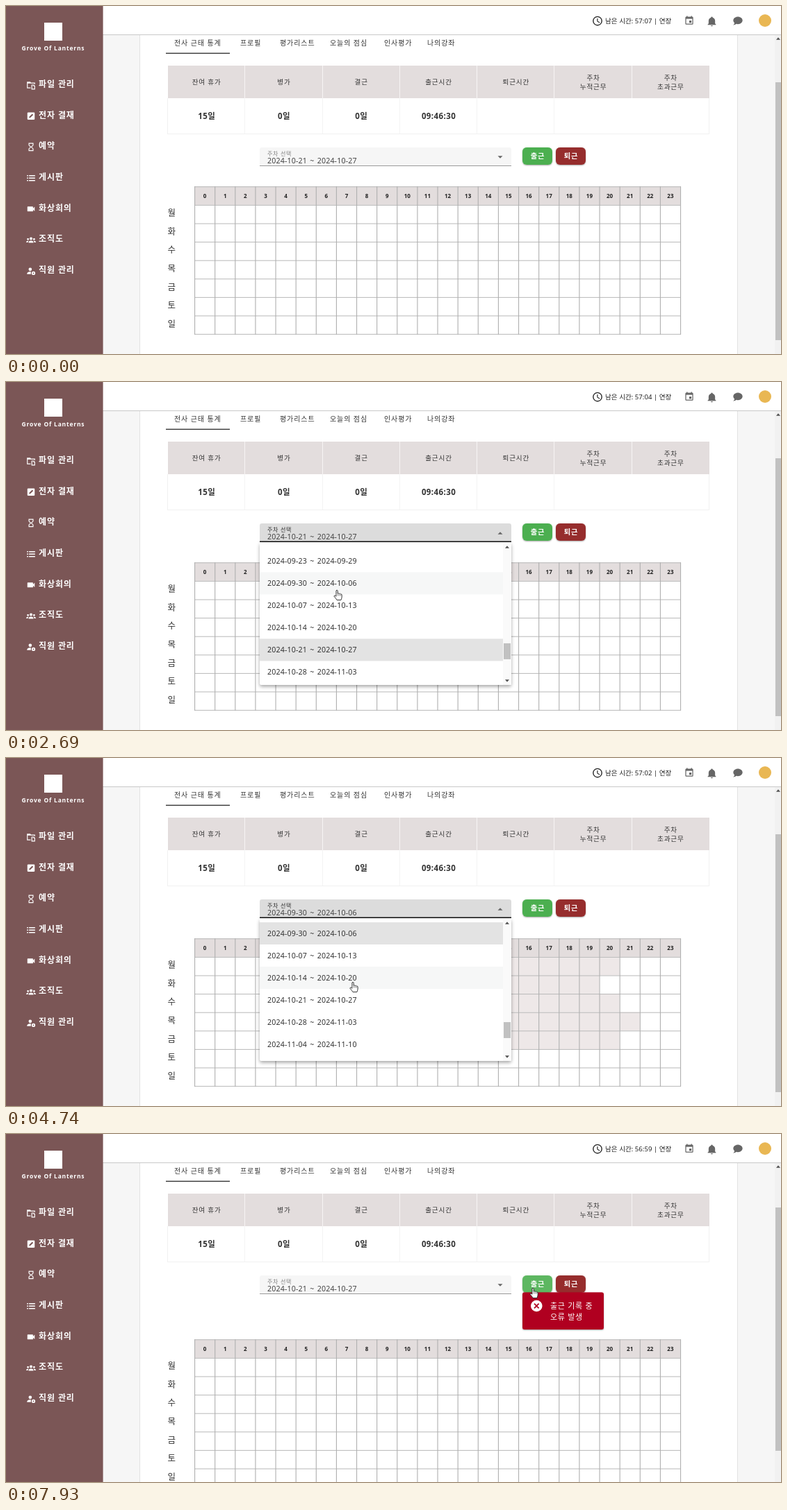
These frames come from a looping animation (1115x502 px, 8000 ms). An HTML page with a canvas:

```html
<!DOCTYPE html>
<html lang="ko">
<head>
<meta charset="utf-8">
<style>
html, body { margin: 0; width: 100%; height: 100%; overflow: hidden; background: #fff; }
canvas { display: block; }
</style>
</head>
<body>
<canvas id="stage" width="1115" height="502"></canvas>
<script>
const ctx = document.getElementById('stage').getContext('2d');
const LOOP = 8000;
const FAMILY = '"Noto Sans", "Noto Sans CJK KR", "Noto Sans CJK", sans-serif';

// Event times in ms
const FIRST_TICK = 300, FOCUS = 1170, BLUR = 7540, ERROR = 7700;
const MENUS = [
  { click: FOCUS, open: 1300, close: 2900, selected: 3 },
  { click: 4050, open: 4130, close: 5550, selected: 0 }
];
const DATA_ON = 3120, DATA_OFF = 5800;
const HOURS = [[9, 20], [8, 19], [8, 20], [9, 21], [9, 20]];

// Pointer path: time, x, y
const PATH = [
  [190, 1027, 485], [810, 560, 240], [950, 560, 240], [1150, 495, 226], [1180, 494, 227],
  [1280, 491, 242], [1750, 479, 330], [1880, 479, 330], [2030, 470, 275], [2250, 472, 285],
  [2570, 475, 294], [2630, 475, 294], [2690, 476, 300], [2840, 476, 300], [3310, 549, 330],
  [3450, 556, 335], [3650, 556, 335], [3950, 520, 222], [4060, 520, 222], [4400, 512, 262],
  [4470, 512, 262], [4580, 503, 312], [4740, 499, 323], [5070, 482, 347], [5500, 482, 347],
  [5600, 482, 349], [6070, 614, 221], [6140, 614, 221], [6900, 745, 223], [6960, 745, 223],
  [7370, 758, 222]
];

const ICONS = {
  clock: 'M12 2A10 10 0 1 0 12 22A10 10 0 1 0 12 2M12 4A8 8 0 1 1 12 20A8 8 0 1 1 12 4M11 7H12.7V12.2L17 14.8L16.2 16.2L11 13Z',
  calendar: 'M5 3H6V1H8V3H16V1H18V3H19Q21 3 21 5V19Q21 21 19 21H5Q3 21 3 19V5Q3 3 5 3M5 8V19H19V8ZM12 12H17V17H12Z',
  bell: 'M21 19V20H3V19L5 17V11C5 7.9 7 5.2 10 4.3A2 2 0 1 1 14 4.3C17 5.2 19 7.9 19 11V17ZM14 21A2 2 0 0 1 10 21Z',
  chat: 'M12 3C17.5 3 22 6.6 22 11S17.5 19 12 19Q10 19 8.5 18.5C5.5 21 2 21 2 21Q4.6 18.4 4.7 16.5C3 15 2 13.1 2 11C2 6.6 6.5 3 12 3Z',
  folder: 'M2 4H10L12 6H22V10H20V8H4V18H11V20H2ZM13 11H19L22 14V23H13ZM15 13V21H20V15H18V13Z',
  edit: 'M5 3H19Q21 3 21 5V19Q21 21 19 21H5Q3 21 3 19V5Q3 3 5 3M7 17L10.5 16L17.5 9L15 6.5L8 13.5Z',
  hourglass: 'M6 2H18V8L14 12L18 16V22H6V16L10 12L6 8ZM8 4V7.5L12 11.5L16 7.5V4ZM12 12.5L8 16.5V20H16V16.5Z',
  list: 'M2 5H5V7.5H2ZM7 5H22V7.5H7ZM2 11H5V13.5H2ZM7 11H22V13.5H7ZM2 17H5V19.5H2ZM7 17H22V19.5H7Z',
  video: 'M4 6H16Q17 6 17 7V10.5L21 6.5V17.5L17 13.5V17Q17 18 16 18H4Q3 18 3 17V7Q3 6 4 6Z',
  group: 'M8.5 8.5A3.5 3.5 0 0 1 15.5 8.5A3.5 3.5 0 0 1 8.5 8.5M6 19Q6 13.5 12 13.5T18 19ZM2 10A2.5 2.5 0 0 1 7 10A2.5 2.5 0 0 1 2 10M17 10A2.5 2.5 0 0 1 22 10A2.5 2.5 0 0 1 17 10M0 18Q0 13.5 6 13.5Q4.5 15 4.5 18ZM24 18Q24 13.5 18 13.5Q19.5 15 19.5 18Z',
  staff: 'M6 8A4 4 0 0 1 14 8A4 4 0 0 1 6 8M2 20Q2 14 10 14H12Q11 17 12 20ZM13.5 17.5A4.5 4.5 0 0 1 22.5 17.5A4.5 4.5 0 0 1 13.5 17.5M16.5 17.5A1.5 1.5 0 0 0 19.5 17.5A1.5 1.5 0 0 0 16.5 17.5'
};
for (const name in ICONS) ICONS[name] = new Path2D(ICONS[name]);
const ARROW = new Path2D('M0 0V10.5L2.4 8.4L4 12L5.7 11.2L4.1 7.8H7.2Z');
const HAND = new Path2D('M-1 1Q0 -1 1.2 1V5.2Q2.5 4.2 3.4 5.4Q4.6 4.6 5.4 6Q7 5.5 7.2 7.2V10Q7 12 6 14.5H0Q-1 12.5 -4 9.2Q-4 7.5 -2.2 8.2L-1 9.2Z');

const clamp = v => Math.max(0, Math.min(1, v));
const progress = (t, start, length) => clamp((t - start) / length);
const smooth = p => p * p * (3 - 2 * p);
const easeOut = p => 1 - (1 - p) * (1 - p);
const inside = (p, x0, y0, x1, y1) => p.x >= x0 && p.x <= x1 && p.y >= y0 && p.y <= y1;

function rect(x, y, w, h, fill) {
  ctx.fillStyle = fill;
  ctx.fillRect(x, y, w, h);
}

function panel(x, y, w, h, radius, fill, shadow = 0) {
  const shape = new Path2D();
  shape.roundRect(x, y, w, h, radius);
  if (shadow) {
    // Keep the shadow outside the shape so that it never tints a translucent panel
    const outside = new Path2D(shape);
    outside.rect(x - 20, y - 20, w + 40, h + 40);
    ctx.save();
    ctx.clip(outside, 'evenodd');
    ctx.shadowColor = 'rgba(0,0,0,.35)';
    ctx.shadowBlur = shadow;
    ctx.shadowOffsetY = shadow / 2;
    ctx.fillStyle = fill;
    ctx.fill(shape);
    ctx.restore();
  }
  ctx.fillStyle = fill;
  ctx.fill(shape);
}

// y is the optical centre of the line
function text(str, x, y, size, { color = '#333', weight = 400, gap = 0, wordGap = 0, align = 'left' } = {}) {
  ctx.font = `${weight} ${size}px ${FAMILY}`;
  ctx.letterSpacing = gap + 'px';
  ctx.wordSpacing = wordGap + 'px';
  ctx.textAlign = align;
  ctx.fillStyle = color;
  ctx.fillText(str, x, y + size * 0.37);
}

function icon(name, cx, cy, size, color) {
  ctx.save();
  ctx.translate(cx - size / 2, cy - size / 2);
  ctx.scale(size / 24, size / 24);
  ctx.fillStyle = color;
  ctx.fill(ICONS[name], 'evenodd');
  ctx.restore();
}

function triangle(cx, cy, w, h, angle, color) {
  ctx.save();
  ctx.translate(cx, cy);
  ctx.rotate(angle);
  ctx.fillStyle = color;
  ctx.beginPath();
  ctx.moveTo(-w / 2, -h / 2);
  ctx.lineTo(w / 2, -h / 2);
  ctx.lineTo(0, h / 2);
  ctx.fill();
  ctx.restore();
}

function drawWeek(i, y, color) {
  const day = n => new Date(Date.UTC(2024, 8, 30 + 7 * i + n)).toISOString().slice(0, 10);
  text(`${day(0)} ~ ${day(6)}`, 376, y, 10.67, { color, gap: 0.14, wordGap: 1.3 });
}

function pointerAt(t) {
  const next = PATH.findIndex(k => k[0] > t);
  if (next === 0) return { x: -99, y: -99 };
  const b = PATH[next < 0 ? PATH.length - 1 : next];
  const a = next < 0 ? b : PATH[next - 1];
  const p = a === b ? 0 : (t - a[0]) / (b[0] - a[0]);
  return { x: a[1] + (b[1] - a[1]) * p, y: a[2] + (b[2] - a[2]) * p };
}

function drawSidebar() {
  rect(0, 0, 139.6, 502, '#7b5656');
  rect(55, 24, 26, 26, '#fff');
  text('Grove Of Lanterns', 68, 61, 8.5, { color: '#fff', weight: 700, gap: 0.8, align: 'center' });
  const items = [['folder', '파일 관리'], ['edit', '전자 결재'], ['hourglass', '예약'], ['list', '게시판'],
    ['video', '화상회의'], ['group', '조직도'], ['staff', '직원 관리']];
  items.forEach(([name, label], i) => {
    const y = 112.5 + i * 44.7;
    icon(name, 36, y + 1.5, 14, '#fff');
    text(label, 47, y, 12, { color: '#fff', weight: 700, gap: 0.9 });
  });
}

function drawHeader(t) {
  rect(139, 0, 976, 41, '#fff');
  rect(139, 41, 976, 1, '#c9c9c9');
  const left = 57 * 60 + 7 - Math.max(0, Math.floor((t - FIRST_TICK) / 1000) + 1);
  const clock = `${Math.floor(left / 60)}:${String(left % 60).padStart(2, '0')}`;
  icon('clock', 851, 21.5, 16.5, '#222');
  text(`남은 시간: ${clock} | 연장`, 862, 21, 9.6, { color: '#222' });
  icon('calendar', 983, 21, 15, '#666');
  icon('bell', 1015.5, 22, 16, '#666');
  icon('chat', 1053, 21.5, 16, '#666');
  ctx.fillStyle = '#e9b753';
  ctx.beginPath();
  ctx.arc(1092, 21, 9, 0, 7);
  ctx.fill();
}

function drawPage(t) {
  rect(139, 42, 976, 460, '#f6f6f6');
  rect(192, 42, 861, 460, '#e2e2e2');
  rect(193, 42, 859, 460, '#fff');
  const tabs = [['전사 근태 통계', 242], ['프로필', 337], ['평가리스트', 394], ['오늘의 점심', 466], ['인사평가', 544], ['나의강좌', 606]];
  tabs.forEach(([label, x]) => text(label, x, 53.5, 10, { gap: 0.9 }));
  rect(230, 67.5, 92, 1.5, '#444');

  const heads = ['잔여 휴가', '병가', '결근', '출근시간', '퇴근시간', '주차|누적근무', '주차|초과근무'];
  const values = ['15일', '0일', '0일', '09:46:30'];
  const step = 779 / 7;
  rect(233, 86, 779, 47, '#e3dddd');
  rect(233, 184, 779, 1, '#f1f1f1');
  rect(232, 133, 1, 52, '#f1f1f1');
  rect(1011, 133, 1, 52, '#f1f1f1');
  heads.forEach((head, i) => {
    const cx = 233 + step * (i + 0.5);
    const lines = head.split('|');
    lines.forEach((line, n) =>
      text(line, cx, 109.5 + (n - (lines.length - 1) / 2) * 13, 9.6, { gap: 0.8, align: 'center' }));
    if (i) rect(Math.round(233 + step * i) - 1, 86, 1, 47, '#f7f4f4');
    if (i && i < 6) rect(Math.round(233 + step * i) - 1, 133, 1, 51, '#f4f4f4');
    if (values[i]) text(values[i], cx, 159, 11.5, { weight: 700, gap: 0.4, align: 'center' });
  });

  const error = t >= ERROR;
  rect(1106, 42, 9, 460, '#f1f1f1');
  triangle(1111, 47, 6, 3.5, Math.PI, '#505050');
  rect(1107, error ? 106 : 110, 8, error ? 351 : 372, '#c1c1c1');
}

function drawGrid(t) {
  const x0 = 271, y0 = t >= ERROR ? 296.3 : 260.3, cw = 699 / 24, rh = 26.6;
  rect(x0, y0, 700, rh, '#e3dddd');
  if (t >= DATA_ON && t < DATA_OFF) {
    HOURS.forEach(([from, to], r) =>
      rect(x0 + from * cw, y0 + rh * (r + 1), (to - from + 1) * cw, rh, '#eee8e8'));
  }
  for (let r = 0; r <= 8; r++) rect(x0, y0 + r * rh, 700, 1, '#b8b8b8');
  for (let c = 0; c <= 24; c++) {
    rect(x0 + c * cw, y0, 1.1, rh * 8 + 1, '#b0b0b0');
    if (c < 24) text(String(c), x0 + cw * (c + 0.5) + 0.5, y0 + 13.7, 8, { weight: 700, color: '#222', align: 'center' });
  }
  [...'월화수목금토일'].forEach((day, r) => text(day, 232.5, y0 + 38.2 + r * rh, 12.5));
}

function drawSelect(t, pointer) {
  const focus = t < BLUR ? easeOut(progress(t, FOCUS, 250)) : 1 - progress(t, BLUR, 150);
  const hover = inside(pointer, 365, 204, 727, 231);
  const shade = 0.037 + 0.1 * focus + (hover ? 0.045 * (1 - focus) : 0);
  panel(365, 204, 362, 27, [3, 3, 0, 0], `rgba(0,0,0,${shade})`);
  rect(365, 230, 362, 1, hover ? '#555' : '#9a9a9a');
  if (focus) rect(546 - 181 * focus, 229.5, 362 * focus, 1.5, '#111');
  text('주차 선택', 376, 213, 8, { color: focus > 0.3 ? '#333' : '#858585', gap: 0.7 });
  drawWeek(t >= 2890 && t < 5540 ? 0 : 3, 223.5, '#444');

  let turn = 0;
  for (const m of MENUS) {
    if (t >= m.click) turn = smooth(progress(t, m.click, 220)) - smooth(progress(t, m.close - 10, 220));
  }
  triangle(711, 218, 7, 3.6, turn * Math.PI, '#666');
}

function listScroll(t, menu) {
  const notch = start => 66.7 * easeOut(progress(t, start, 260));
  return menu.selected * 32 - (menu.selected ? notch(1900) + notch(2210) : 0);
}

function drawMenu(t) {
  const menu = MENUS.find(m => t >= m.open && t < m.close + 160);
  if (!menu) return;
  const opening = easeOut(progress(t, menu.open, 220));
  const closing = progress(t, menu.close, 160);
  const shown = opening * (1 - closing);
  const listAlpha = clamp((opening - 0.33) / 0.67) * clamp(1 - closing * 5);
  const scroll = listScroll(t, menu);
  const rowY = i => 253 + 32 * i - scroll;

  ctx.save();
  ctx.globalAlpha = shown;
  ctx.translate(0, 232);
  ctx.scale(1, 0.13 + 0.87 * shown);
  ctx.translate(0, -232);
  panel(365, 232, 362, 205, [0, 0, 3, 3], '#fff', 5);
  rect(715, 232, 12, 205, '#fafafa');
  triangle(721, 238, 6, 3.5, Math.PI, '#505050');
  triangle(721, 431, 6, 3.5, 0, '#505050');
  rect(716, 381 + scroll * 0.109, 10, 23, '#c1c1c1');

  ctx.globalAlpha = shown * listAlpha;
  ctx.beginPath();
  ctx.rect(365, 232, 350, 205);
  ctx.clip();
  const trail = pointerAt(t - 150);
  for (let i = -3; i < 11; i++) {
    const y = rowY(i);
    if (y < 215 || y > 455) continue;
    if (i === menu.selected) rect(365, y - 16, 350, 32, '#e3e3e3');
    else if (inside(trail, 365, y - 16, 715, y + 16)) rect(365, y - 16, 350, 32, '#f6f7f7');
    drawWeek(i, y, '#333');
  }
  ctx.restore();
}

function drawButtons(t, pointer) {
  const hover = inside(pointer, 743, 204, 786, 229);
  const label = { color: '#fff', weight: 700, gap: 0.8, align: 'center' };
  panel(743, 204, 43, 25, 6, hover ? '#5db761' : '#4caf50', 2);
  const ripple = progress(t, 7510, 300);
  if (ripple > 0 && ripple < 1) {
    ctx.save();
    ctx.beginPath();
    ctx.roundRect(743, 204, 43, 25, 6);
    ctx.clip();
    ctx.fillStyle = `rgba(255,255,255,${0.25 * (1 - ripple)})`;
    ctx.beginPath();
    ctx.arc(758, 222, 45 * easeOut(ripple), 0, 7);
    ctx.fill();
    ctx.restore();
  }
  text('출근', 765, 216.5, 10.3, label);
  panel(791, 204, 43, 25, 6, '#962d2d', 2);
  text('퇴근', 813, 216.5, 10.3, label);
}

function drawToast(t) {
  const p = easeOut(progress(t, ERROR, 200));
  if (!p) return;
  ctx.save();
  ctx.globalAlpha = p;
  ctx.translate(801.5, 255);
  ctx.scale(0.8 + 0.2 * p, 0.8 + 0.2 * p);
  ctx.translate(-801.5, -255);
  panel(743, 228.5, 117, 53.5, 3, '#b00020', 2);
  ctx.fillStyle = '#fff';
  ctx.beginPath();
  ctx.arc(763.3, 248, 8.3, 0, 7);
  ctx.fill();
  ctx.strokeStyle = '#b00020';
  ctx.lineWidth = 1.8;
  ctx.beginPath();
  ctx.moveTo(760, 244.7);
  ctx.lineTo(766.6, 251.3);
  ctx.moveTo(766.6, 244.7);
  ctx.lineTo(760, 251.3);
  ctx.stroke();
  text('출근 기록 중', 783, 247.5, 11, { color: '#fff', gap: 0.7 });
  text('오류 발생', 783, 263.5, 11, { color: '#fff', gap: 0.7 });
  ctx.restore();
}

function drawPointer(t, p) {
  const inMenu = MENUS.some(m => t >= m.open + 100 && t < m.close) && inside(p, 365, 232, 715, 437);
  const hand = inMenu || inside(p, 365, 204, 727, 231) || inside(p, 743, 204, 786, 229);
  const shape = hand ? HAND : ARROW;
  ctx.save();
  ctx.translate(p.x, p.y);
  ctx.fillStyle = '#fff';
  ctx.strokeStyle = '#222';
  ctx.lineWidth = 0.9;
  ctx.lineJoin = 'round';
  ctx.fill(shape);
  ctx.stroke(shape);
  if (hand) {
    rect(1.2, 5.5, 0.6, 3, '#444');
    rect(3.2, 6, 0.6, 2.6, '#444');
    rect(5.2, 6.5, 0.6, 2.2, '#444');
  }
  ctx.restore();
}

function render(now) {
  const t = now % LOOP;
  const pointer = pointerAt(t);
  drawPage(t);
  drawGrid(t);
  drawSelect(t, pointer);
  drawButtons(t, pointer);
  drawMenu(t);
  drawToast(t);
  drawHeader(t);
  drawSidebar();
  drawPointer(t, pointer);
  requestAnimationFrame(render);
}
requestAnimationFrame(render);
</script>
</body>
</html>
```
